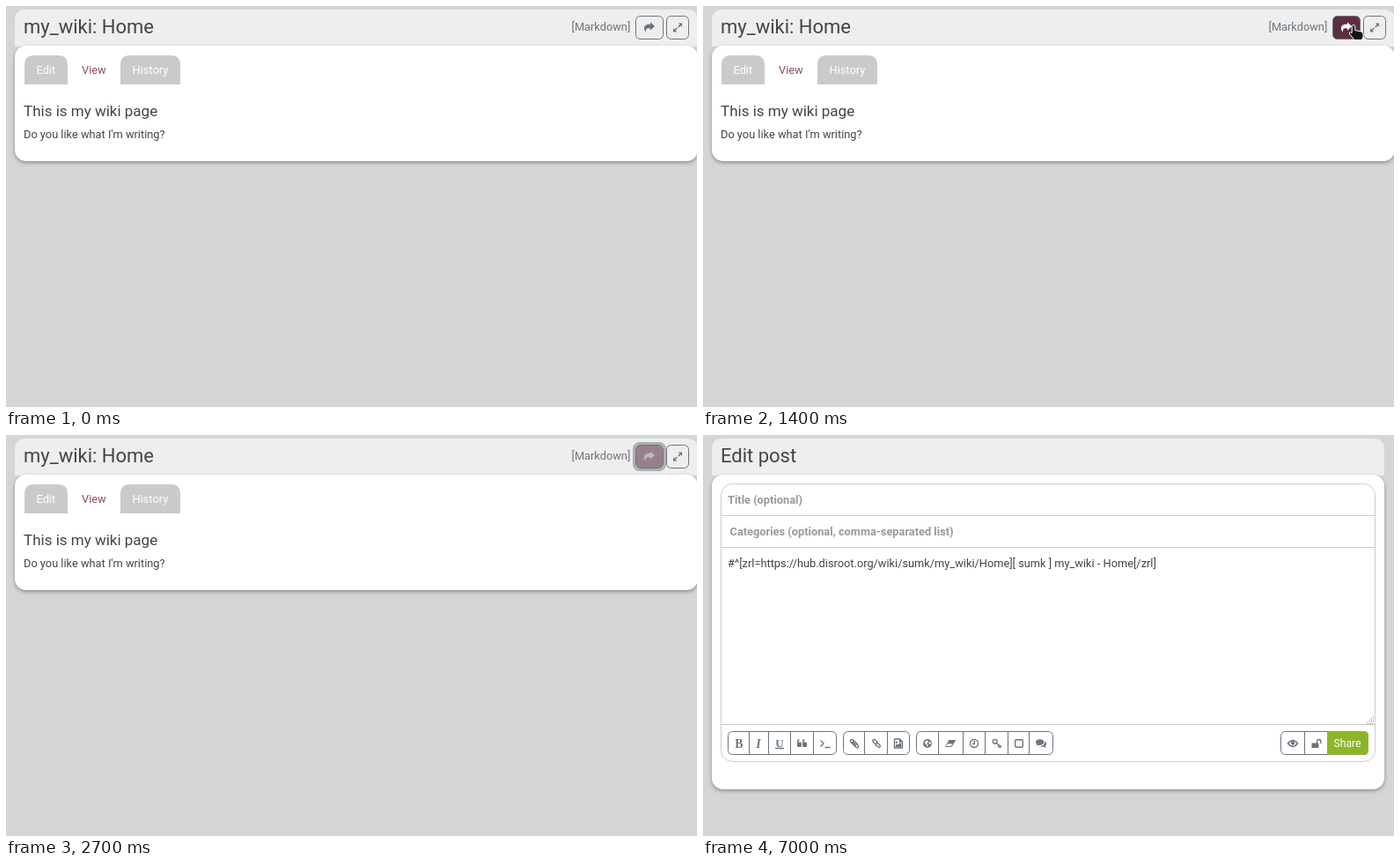
Write an HTML page that moves like this. It is 785 px wide and 455 px high and loops after 9500 ms.

```html
<!DOCTYPE html>
<html lang="en">
<head>
<meta charset="utf-8">
<title>Wiki sharing</title>
<style>
  html, body { margin: 0; width: 100%; height: 100%; overflow: hidden; background: #d5d5d5; }
  svg { display: block; }
  text { font: 12.8px Roboto, sans-serif; fill: #444; white-space: pre; }
  .title { font-size: 22px; }
  .heading { font-size: 17px; }
  .muted { fill: #6c757d; }
  .white { fill: #fff; }
  .hint { font-weight: bold; fill: #999; }
  .serif { font: bold 14px "Liberation Serif", serif; fill: #6c757d; text-anchor: middle; }
  .head { fill: #eee; }
  .panel { fill: #fff; filter: drop-shadow(0 2px 2px rgba(0, 0, 0, .33)); }
  .tab { fill: #cacaca; }
  .rule { fill: none; stroke: #ccc; }
  .outline { fill: none; stroke: #6c757d; }
  .icon { fill: #6c757d; }
  .line { fill: none; stroke: #6c757d; stroke-width: 1.4; }
</style>
</head>
<body>
<svg width="785" height="455" viewBox="0 0 785 455">
  <g id="wiki">
    <path class="head" d="M10 46V17Q10 4 23 4H773Q786 4 786 17V46Z"/>
    <rect class="panel" x="10" y="45" width="776" height="131" rx="13"/>
    <text class="title" x="20" y="31">my_wiki: Home</text>
    <text class="muted" x="642.5" y="28">[Markdown]</text>
    <rect id="ring" x="713.5" y="9.5" width="35" height="30" rx="6.5" fill="none" stroke="#6c757d" stroke-opacity=".5" stroke-width="3"/>
    <rect id="share" class="outline" x="715.5" y="11.5" width="31" height="26" rx="5"/>
    <path id="arrow" d="M737 23L732 18.3V20.8H730.5C726.5 20.8 725 23 725 25.5C725 27.5 726 29 727 29.8C726.5 26.5 727.5 25.3 730.5 25.3H732V27.7Z"/>
    <rect class="outline" x="750.5" y="11.5" width="25" height="26" rx="5"/>
    <path class="icon" d="M768 19.5v4.2l-1.4-1.4-2.3 2.3-1.1-1.1 2.3-2.3-1.7-1.7zM758 29.5v-4.2l1.4 1.4 2.3-2.3 1.1 1.1-2.3 2.3 1.7 1.7z"/>
    <path class="tab" d="M21 89V67Q21 56 32 56H59Q70 56 70 67V89ZM130 89V67Q130 56 141 56H187Q198 56 198 67V89Z"/>
    <text class="white" x="34.5" y="77">Edit</text>
    <text x="86" y="77" style="fill:#884c63">View</text>
    <text class="white" x="143.5" y="77">History</text>
    <text class="heading" x="20" y="125">This is my wiki page</text>
    <text x="20" y="150">Do you like what I'm writing?</text>
    <path id="cursor" fill="#111" stroke="#fff" stroke-linejoin="round" d="M-1.8 1Q0-1.5 1.8 1V6L8.5 7.5Q11 8 11 10.5V13L9.5 17H1L-5 9.5Q-4 7.3-1.8 9Z"/>
  </g>

  <g id="editor">
    <path class="head" d="M10 46V17Q10 4 23 4H761Q774 4 774 17V46Z"/>
    <rect class="panel" x="10" y="45" width="764" height="357" rx="13"/>
    <text class="title" x="20" y="31">Edit post</text>
    <rect class="rule" x="20.5" y="55.5" width="743" height="315" rx="13"/>
    <path class="rule" d="M21 91.5H763M21 127.5H763M21 328.5H763"/>
    <text class="hint" x="28" y="78">Title (optional)</text>
    <text class="hint" id="categories" y="114">Categories (optional, comma-separated list)</text>
    <text x="28" y="150">#^[zrl=https://hub.disroot.org/wiki/sumk/my_wiki/Home][ sumk ] my_wiki - Home[/zrl]</text>
    <path stroke="#999" stroke-dasharray="1 1" d="M761 319.5h1M759 321.5h3M757 323.5h5M755 325.5h7M754 327.5h8"/>
    <g class="outline">
      <rect x="28.5" y="336.5" width="123" height="26" rx="5"/>
      <rect x="159.5" y="336.5" width="75" height="26" rx="5"/>
      <rect x="242.5" y="336.5" width="155" height="26" rx="5"/>
      <rect x="656.5" y="336.5" width="99" height="26" rx="5"/>
      <path id="dividers"/>
    </g>
    <path fill="#8db52b" d="M709 336H751Q756 336 756 341V358Q756 363 751 363H709Z"/>
    <text class="white" x="716.5" y="354" style="font-size:12.2px">Share</text>
    <text class="serif" x="41" y="355">B</text>
    <text class="serif" x="63" y="355" font-style="italic" style="font-style:italic">I</text>
    <text class="serif" x="87" y="354" style="font-size:13px">U</text>
    <path class="line" stroke-width="1" d="M82 355.5H92"/>
    <g id="icons"></g>
  </g>
</svg>
<script>
const $ = id => document.getElementById(id);

$('dividers').setAttribute('d', [52, 74, 99, 125, 183, 209, 267, 295, 320, 346, 370, 683]
  .map(x => `M${x}.5 337v25`).join(''));

// Toolbar icons: centre x, filled path, stroked path
const icons = [
  [112.5, 'M-5.5-3Q-5.5-5-3-5V-3.7Q-4-3.6-4-2.2V-1.5H-1.8Q-.6-1.5-.6-.3V2.7Q-.6 4-1.8 4H-4.3Q-5.5 4-5.5 2.7ZM.6-3Q.6-5 3.1-5V-3.7Q2.1-3.6 2.1-2.2V-1.5H4.3Q5.5-1.5 5.5-.3V2.7Q5.5 4 4.3 4H1.8Q.6 4 .6 2.7Z', ''],
  [138.5, '', 'M-5-3.5L-1.5 0L-5 3.5M0 4.5H6'],
  [172, '', 'M4 1.5L-1.5-4Q-3.2-5-4.3-3.8Q-5-2.5-4-1.5L2 4.5Q3.5 5.3 4.5 4.2Q5.2 3 4 2L-1-3L-2-1.5L2 2.5'],
  [197, '', 'M-.5 1L-3.5-1.5Q-5-3-3.5-4.2Q-2.2-5-1-3.8L1-1.5L0 0M.5-1L3.7 1.5Q5 3 3.7 4.2Q2.3 5-.8 1.8L0 0'],
  [222, 'M-3 4V2L-1.5.5L-.5 1.5L2-1L3.3.5V4ZM-3.2-2.2h2v2h-2Z', 'M-4.5-5H1.5L4.5-2V5H-4.5ZM1.5-5V-2H4.5'],
  [255, 'M-5 0A5 5 0 0 1 5 0A5 5 0 0 1-5 0ZM-3.5-1.5L-2 1L-.5 2L-1 4L1 2L-1 0L1.2-2L0-3.8ZM2-2L1.5 0L3.5 1.5L4-1Z', ''],
  [281, 'M-1.5-4H6.3L1.5 4H-6.3ZM-3.4.4L-5 3H.9L2.5.4Z', ''],
  [308, '', 'M-4.5 0A4.5 4.5 0 0 1 4.5 0A4.5 4.5 0 0 1-4.5 0ZM.3-3V.5H-2'],
  [334, '', 'M-4.7-2.2A2.4 2.4 0 0 1 .1-2.2A2.4 2.4 0 0 1-4.7-2.2ZM-.7-.5L5 4M2.5 2L1 4M4 3.2L2.7 5'],
  [359, '', 'M-3-4.2H3Q4.3-4.2 4.3-3V3Q4.3 4.2 3 4.2H-3Q-4.3 4.2-4.3 3V-3Q-4.3-4.2-3-4.2Z'],
  [384, 'M-6-1.5C-6-6 3.5-6 3.5-1.5C3.5 1-.5 2.5-3 1.7L-5.5 3L-4.5 1Q-6 0-6-1.5ZM4.5-2.5C7-1 6.5 2 4.8 2.8L6 5L3 3.7C1 4 -.5 3.7-1.5 3C2 3 5 1 4.5-2.5Z', ''],
  [670, 'M-2.2-.5A2.2 2.2 0 0 1 2.2-.5A2.2 2.2 0 0 1-2.2-.5Z', 'M-5.5 0Q0-7 5.5 0Q0 7-5.5 0Z'],
  [697, 'M-5.5-.5H2.5V5H-5.5Z', 'M.5 0V-2Q.5-4.5 2.7-4.5T4.9-2V0'],
];
$('icons').innerHTML = icons.map(([x, solid, line]) =>
  `<g transform="translate(${x} 350)"><path class="icon" fill-rule="evenodd" d="${solid}"/><path class="line" d="${line}"/></g>`).join('');

// Pointer and button poses: start time, pointer x, y, button fill, arrow colour, ring opacity
const idle = 'rgba(238,238,238,0)', grey = '#6c757d', hover = '#5b2e43', active = '#4a1028';
const poses = [
  [0, -50, -50, idle, grey, 0],
  [700, 718, 66, idle, grey, 0],
  [800, 727, 49, idle, grey, 0],
  [900, 736, 32, '#a58e99', '#b6babe', 0],
  [1000, 741.5, 20, hover, '#fff', 0],
  [1400, 739, 21.5, hover, '#fff', 0],
  [1500, 736, 23, '#521f35', '#fff', 0],
  [1600, 734, 24, active, '#fff', 0],
  [2100, 734, 24, active, '#fff', .6],
  [2200, 734, 24, active, '#fff', 1],
  [2700, -50, -50, '#997f8c', '#b6babe', 1],
  [2800, -50, -50, '#e6e8eb', grey, 1],
];

function draw(now) {
  const t = now % 9500, editing = t >= 6800;
  $('wiki').style.display = editing ? 'none' : '';
  $('editor').style.display = editing ? '' : 'none';
  $('categories').setAttribute('x', t < 7000 ? 21.5 : 30.5);
  const [, x, y, fill, ink, ring] = poses.findLast(pose => pose[0] <= t);
  $('cursor').setAttribute('transform', `translate(${x} ${y})`);
  $('share').style.fill = fill;
  $('arrow').style.fill = ink;
  $('ring').style.opacity = ring;
}

const start = performance.now();
function tick() {
  draw(performance.now() - start);
  requestAnimationFrame(tick);
}
tick();
</script>
</body>
</html>
```
